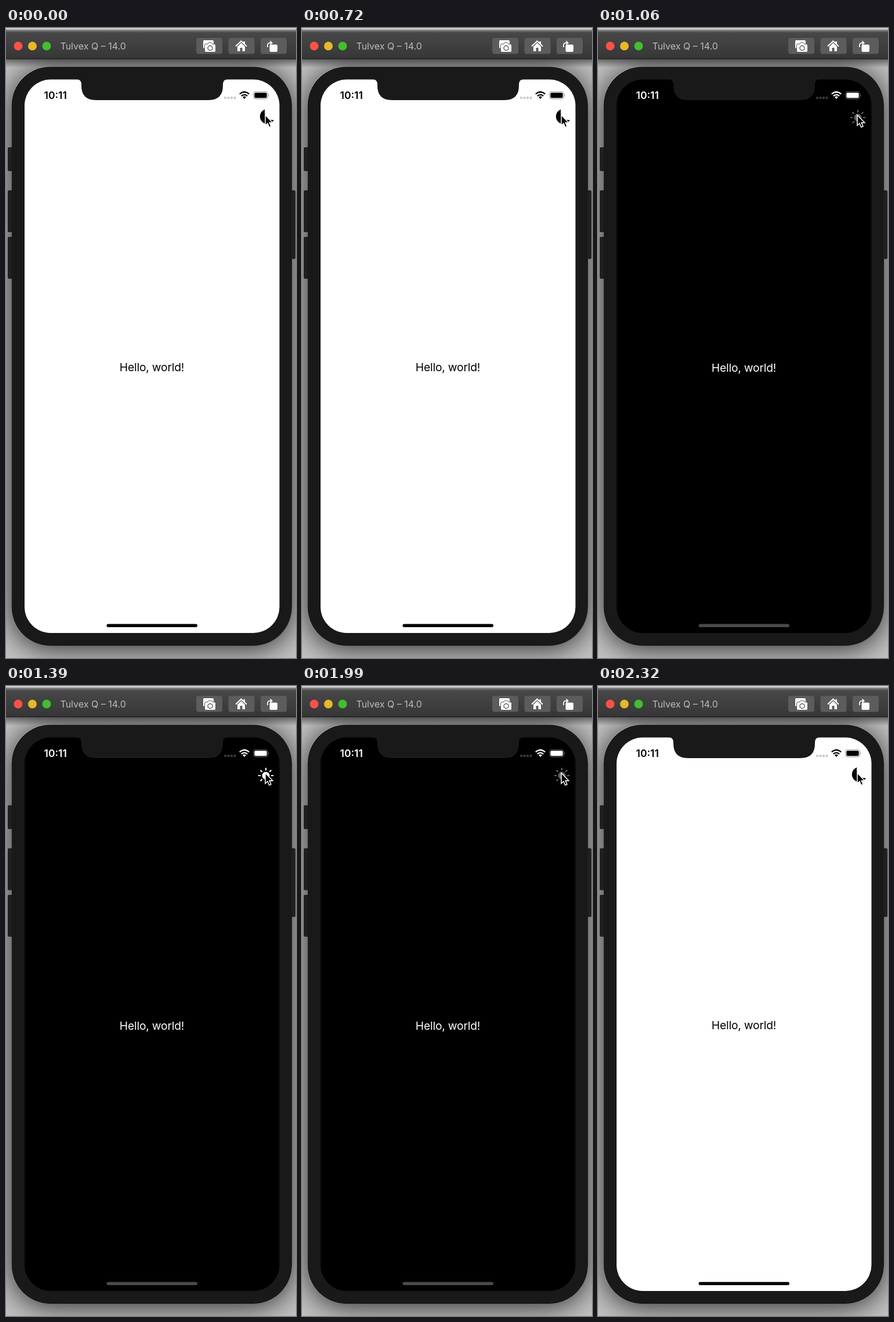
Animation, 500 px wide and 1083 px high, one loop 2380 ms. Source, as an HTML page:

```html
<!DOCTYPE html>
<html lang="en">
<head>
<meta charset="utf-8">
<title>Dark mode toggle</title>
<style>
  html, body { margin: 0; width: 100%; height: 100%; overflow: hidden; background: #c4c4c4; }
  #stage { position: relative; width: 500px; height: 1083px; overflow: hidden; }
  #shadow {
    position: absolute; left: 9px; top: 66px; width: 484px; height: 996px;
    border-radius: 67px; box-shadow: 0 5px 50px rgba(0, 0, 0, .8);
  }
  svg { position: absolute; inset: 0; font-family: Inter, Roboto, sans-serif; }
  #screen { --ink: #000; --paper: #fff; --dots: #c8c8c8; --bar: #000; --rim: #999; }
  #screen.dark { --ink: #fff; --paper: #000; --dots: #3c3c3c; --bar: #4a4a4a; --rim: #5c5c5c; }
  .ink { fill: var(--ink); }
  .dark #moon, #screen:not(.dark) #sun { display: none; }
</style>
</head>
<body>
<div id="stage">
  <div id="shadow"></div>
  <svg width="500" height="1083" viewBox="0 0 500 1083">
    <defs>
      <linearGradient id="chrome" x2="0" y2="1">
        <stop stop-color="#484848"/><stop offset="1" stop-color="#363636"/>
      </linearGradient>
      <linearGradient id="fade" x2="0" y2="1">
        <stop stop-opacity=".5"/><stop offset="1" stop-opacity="0"/>
      </linearGradient>
    </defs>

    <!-- title bar -->
    <path fill="#666" d="M0 0h500v7H0z"/>
    <path fill="#a4a4a4" d="M0 0h500v4H0z"/>
    <path fill="#d0d0d0" d="M0 0h500v2H0z"/>
    <path fill="url(#chrome)" d="M0 7h500v46H0z"/>
    <path fill="#222" d="M0 52h500v1.5H0z"/>
    <path fill="url(#fade)" d="M0 53h500v15H0z"/>
    <circle cx="21" cy="31" r="7.5" fill="#fc5049"/>
    <circle cx="45.5" cy="31" r="7.5" fill="#e6b929"/>
    <circle cx="70" cy="31" r="7.5" fill="#42be2f"/>
    <text x="93.5" y="37" font-size="16" fill="#bdbdbd">Tulvex Q – 14.0</text>
    <g fill="#5c5c5c">
      <rect x="328" y="17" width="45" height="27.5" rx="4"/>
      <rect x="383.5" y="17" width="45" height="27.5" rx="4"/>
      <rect x="439" y="17" width="45" height="27.5" rx="4"/>
    </g>
    <g fill="#fff">
      <rect x="340" y="21" width="18" height="14" rx="2"/>
      <path stroke="#5c5c5c" d="M345 27.5h3l1.5-2.5h5l1.5 2.5h3q2.5 0 2.5 2.5v9q0 2.5-2.5 2.5h-14q-2.5 0-2.5-2.5v-9q0-2.5 2.5-2.5z"/>
      <circle cx="352" cy="34.5" r="4" stroke="#5c5c5c" stroke-width="1.5"/>
      <path d="M399 32l6.5-6.5 6.5 6.5v8h-4.5v-6h-4v6H399z"/>
      <path fill="none" stroke="#fff" stroke-width="2" d="M396 31.5l9.5-9 9.5 9"/>
      <path d="M409.5 23h2.5v5l-2.5-2.5z"/>
      <rect x="454.5" y="28.5" width="13.5" height="12.5" rx="2"/>
      <path fill="none" stroke="#fff" stroke-width="1.7" d="M451 33v-3q0-4.5 4.5-4.5h1"/>
      <path d="M455.5 21.5l4.5 4-4.5 4z"/>
    </g>

    <!-- phone -->
    <g fill="#202020">
      <rect x="3" y="205" width="9" height="41" rx="2"/>
      <rect x="3" y="279" width="9" height="72" rx="2"/>
      <rect x="3" y="359" width="9" height="72" rx="2"/>
      <rect x="490" y="279" width="9" height="118" rx="2"/>
    </g>
    <rect x="9.5" y="66.5" width="483.5" height="995.5" rx="67" fill="#191919"/>

    <g id="screen">
      <rect x="32" y="88.5" width="439.5" height="951.5" rx="45" fill="var(--paper)"/>
      <path fill="#191919" d="M121 88q9 0 9 9v2q0 25 25 25h194q25 0 25-25v-2q0-9 9-9z"/>
      <text class="ink" x="65.5" y="122" font-size="17.5" font-weight="600">10:11</text>
      <g fill="var(--dots)">
        <rect x="376" y="118" width="4" height="4" rx="1.5"/>
        <rect x="381.5" y="118" width="4" height="4" rx="1.5"/>
        <rect x="387" y="118" width="4" height="4" rx="1.5"/>
        <rect x="392.5" y="118" width="4" height="4" rx="1.5"/>
      </g>
      <path class="ink" d="M411 122l-3-3.2q3-2.5 6 0z"/>
      <path fill="none" stroke="var(--ink)" stroke-width="2.3" d="M405.8 116.8q5.2-4.4 10.4 0M402.8 113.5q8.2-7 16.4 0"/>
      <rect x="426.5" y="109.5" width="25" height="12.5" rx="3.5" fill="none" stroke="var(--rim)"/>
      <rect class="ink" x="428.3" y="111.3" width="21.4" height="8.9" rx="2"/>
      <path fill="var(--rim)" d="M452.7 113.5q2 2.2 0 4.5z"/>

      <g id="icon">
        <path id="moon" class="ink" d="M446.5 140A12.8 12.8 0 1 0 462 158A14 14 0 0 1 446.5 140z"/>
        <g id="sun">
          <circle class="ink" cx="448" cy="154" r="6.5"/>
          <path id="rays" stroke="var(--ink)" stroke-width="2.2" stroke-linecap="round"/>
        </g>
      </g>

      <text id="hello" class="ink" x="251.5" text-anchor="middle" font-size="19.3" letter-spacing="-.2">Hello, world!</text>
      <rect x="173.5" y="1024.5" width="156.5" height="5.5" rx="2.75" fill="var(--bar)"/>
    </g>

    <path stroke="#fff" stroke-width="1.5" d="M447 149.5v18l4-3.6 2.8 6.6 3.2-1.4-2.8-6.4h5.6z"/>
  </svg>
</div>
<script>
  const LOOP = 2380, PRESS = 990, TO_DARK = 1060, PRESS_AGAIN = 1990, TO_LIGHT = 2060, RELEASE = 200;
  const $ = id => document.getElementById(id);

  $('rays').setAttribute('d', Array.from({ length: 8 }, (_, i) => {
    const x = Math.cos(i * Math.PI / 4), y = Math.sin(i * Math.PI / 4);
    return `M${448 + 9.8 * x} ${154 + 9.8 * y}L${448 + 12.4 * x} ${154 + 12.4 * y}`;
  }).join(''));

  // The icon dims at once when pressed and fades back after the theme flips.
  function opacity(t, press, flip, dim) {
    if (t < press) return 1;
    return dim + (1 - dim) * Math.min(1, Math.max(0, (t - flip - 30) / RELEASE));
  }

  function draw(now) {
    const t = now % LOOP, dark = t >= TO_DARK && t < TO_LIGHT;
    const dim = dark ? .38 : .24;
    $('screen').classList.toggle('dark', dark);
    $('hello').setAttribute('y', dark ? 591 : 590);
    $('icon').setAttribute('opacity', t < PRESS_AGAIN
      ? opacity(t, PRESS, TO_DARK, dim)
      : opacity(t, PRESS_AGAIN, TO_LIGHT, dim));
  }

  const start = performance.now();
  function tick() {
    draw(performance.now() - start);
    requestAnimationFrame(tick);
  }
  tick();
</script>
</body>
</html>
```
